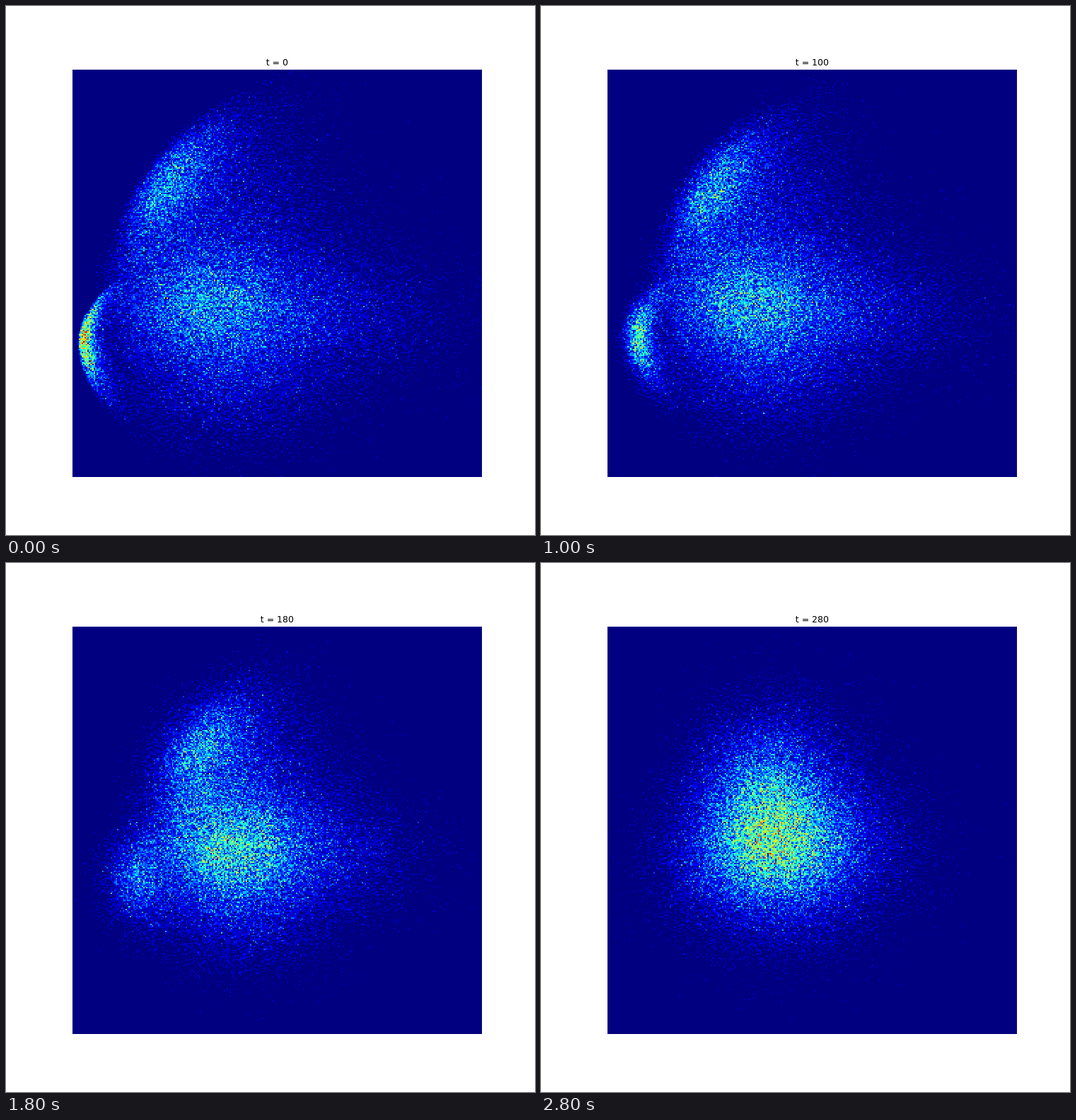
Animation of 748 by 748 pixels, one loop 3000 ms. Source, as an HTML page with a canvas:

```html
<!DOCTYPE html>
<html lang="en">
<head>
<meta charset="utf-8">
<title>Diffusing density</title>
<style>
  html, body { margin: 0; width: 100%; height: 100%; overflow: hidden; background: #fff; }
  svg, canvas { position: absolute; left: 0; top: 0; width: 748px; height: 748px; }
  text { font: 12.5px "DejaVu Sans", sans-serif; text-anchor: middle; }
</style>
</head>
<body>
<canvas id="plot" width="748" height="748"></canvas>
<svg viewBox="0 0 748 748"><text id="title" x="383.4" y="83.5">t = 0</text></svg>
<script>
const STEP = 200, STEPS = 15, BINS = 300, MAX_COUNT = 16;
const LEFT = 93.5, TOP = 89.8, W = 579.7, H = 575.9;

// Where the centre of the body drifts as the axes rescale: [step, x, y]
const DRIFT = [[0, 285, 422], [5, 293, 418], [8, 296, 396], [10, 330, 402], [12, 304, 395], [14, 329, 393]];
const [, HOME_X, HOME_Y] = DRIFT[0];

function random(seed) {
  return () => {
    seed = (seed + 0x6D2B79F5) | 0;
    let r = Math.imul(seed ^ (seed >>> 15), 1 | seed);
    r = (r + Math.imul(r ^ (r >>> 7), 61 | r)) ^ r;
    return ((r ^ (r >>> 14)) >>> 0) / 4294967296;
  };
}

function normal(rand) {
  return () => Math.sqrt(-2 * Math.log(1 - rand())) * Math.cos(2 * Math.PI * rand());
}

function makePoints() {
  const rand = random(7), gauss = normal(rand);
  const exp = () => -Math.log(1 - rand());
  const points = [];
  const add = (count, make) => {
    for (let i = 0; i < count; i++) points.push(make());
  };

  // thin crescent on the left
  add(5300, () => {
    let y;
    do y = 478 + 43 * gauss(); while (y < 395 + 4 * gauss());
    const d = y - 475;
    const bend = d * d / (d < 0 ? 150 : 240);
    const width = 7 * (1 + Math.max(0, d) / 120);
    return [102 + bend + width * (exp() + exp()), y];
  });

  // slanted lobe, firmer on its outer side
  add(11500, () => {
    const u = gauss();
    const across = -44 + 18 * (exp() + exp() + exp()) + 6 * u * u;
    return [232 + 39 * u + 0.8 * across, 254 - 54 * u + 0.6 * across];
  });

  // broad body, cut off along a soft left edge
  const edge = y => 148 + (y - 400) ** 2 * (y < 400 ? 0.0024 : 0.0012);
  const cloud = (count, cx, cy, sx, sy) => add(count, () => {
    let x, y;
    do {
      x = cx + sx * gauss();
      y = cy + sy * gauss();
    } while (x < edge(y) + 14 * gauss());
    return [x, y];
  });
  cloud(18000, 275, 424, 73, 50);
  cloud(11000, 325, 420, 98, 82);
  cloud(7000, 430, 435, 92, 46);
  cloud(4500, 310, 530, 72, 46);
  cloud(5000, 315, 290, 70, 75);
  return points;
}

function drift(step) {
  const i = Math.max(1, DRIFT.findIndex(d => d[0] >= step));
  const a = DRIFT[i - 1], b = DRIFT[i];
  const k = (step - a[0]) / (b[0] - a[0]);
  return [a[1] + (b[1] - a[1]) * k, a[2] + (b[2] - a[2]) * k];
}

function jet(v) {
  const ramp = (lo, hi) => Math.max(0, Math.min(1, (v - lo) / (hi - lo)));
  const r = ramp(0.35, 0.66) - 0.5 * ramp(0.89, 1);
  const g = ramp(0.125, 0.375) - ramp(0.64, 0.91);
  const b = 0.5 + 0.5 * ramp(0, 0.11) - ramp(0.34, 0.65);
  return [r, g, b].map(c => Math.round(c * 255));
}

const points = makePoints();
const palette = Array.from({ length: MAX_COUNT + 1 }, (_, n) => jet(n / MAX_COUNT));
const grid = document.createElement("canvas");
grid.width = grid.height = BINS;
const gridCtx = grid.getContext("2d");
const ctx = document.getElementById("plot").getContext("2d");
const title = document.getElementById("title");
ctx.imageSmoothingEnabled = false;

// Shrink the cloud, blur it with fresh noise and count points per bin
function render(step) {
  const u = step / (STEPS - 1);
  const sx = 1 - 0.51 * u ** 1.7, sy = 1 - 0.48 * u ** 2, noise = 46 * u ** 1.6;
  const [cx, cy] = drift(step);
  const gauss = normal(random(100 + step));
  const counts = new Uint16Array(BINS * BINS);
  for (const [px, py] of points) {
    const x = cx + (px - HOME_X) * sx + noise * gauss();
    const y = cy + (py - HOME_Y) * sy + noise * gauss();
    const col = Math.floor((x - LEFT) / W * BINS);
    const row = Math.floor((y - TOP) / H * BINS);
    if (col >= 0 && col < BINS && row >= 0 && row < BINS) counts[row * BINS + col]++;
  }
  const image = gridCtx.createImageData(BINS, BINS);
  counts.forEach((n, i) => {
    image.data.set(palette[Math.min(n, MAX_COUNT)], i * 4);
    image.data[i * 4 + 3] = 255;
  });
  return image;
}

const images = Array.from({ length: STEPS }, (_, i) => render(i));
let shown = -1;

function draw(ms) {
  const step = Math.floor(ms / STEP) % STEPS;
  if (step === shown) return;
  shown = step;
  gridCtx.putImageData(images[step], 0, 0);
  ctx.clearRect(0, 0, 748, 748);
  ctx.drawImage(grid, LEFT, TOP, W, H);
  title.textContent = "t = " + step * 20;
}

const start = performance.now();
function tick() {
  draw(performance.now() - start);
  requestAnimationFrame(tick);
}
tick();
</script>
</body>
</html>
```
